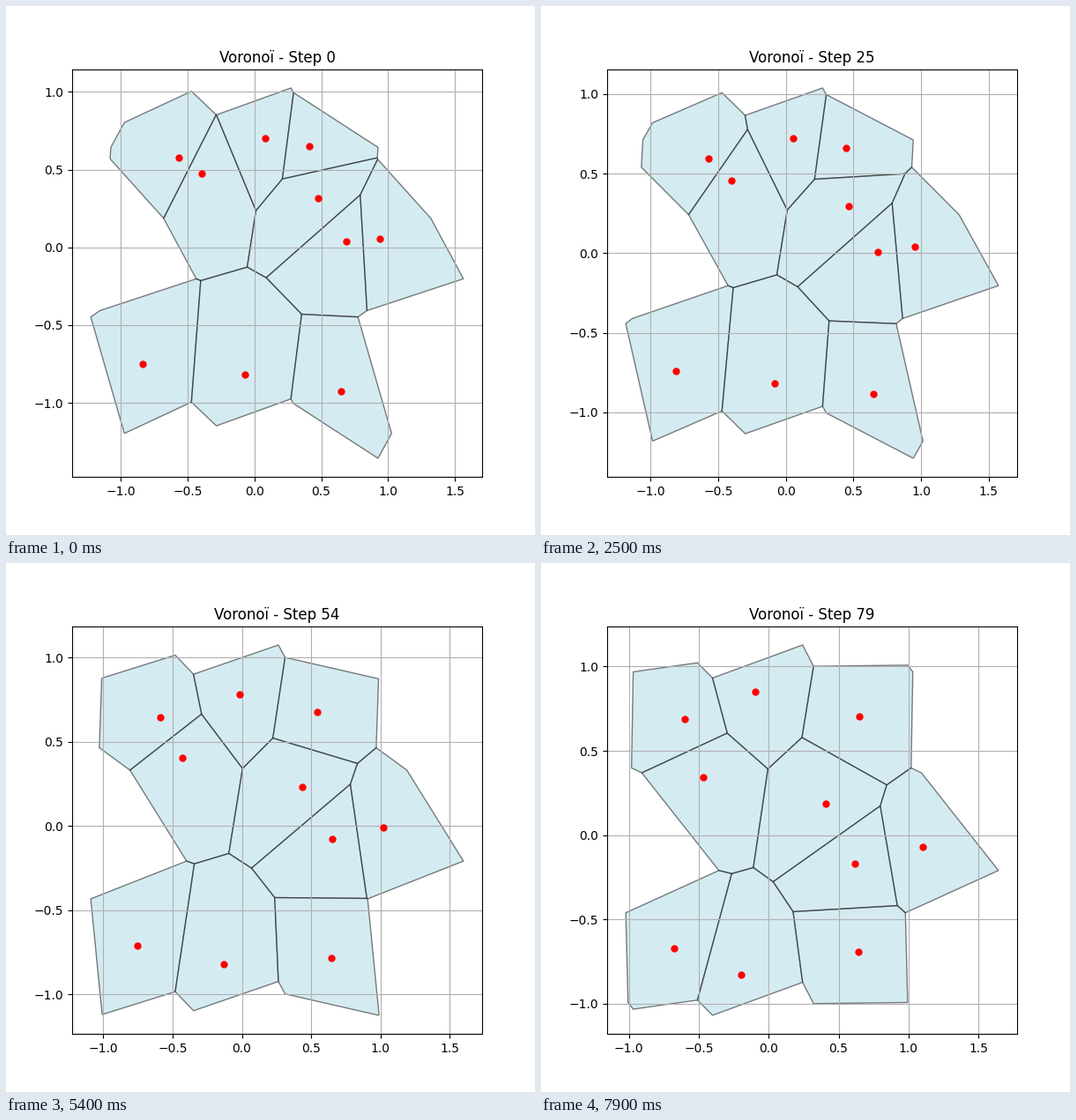
Animation of 600 by 600 pixels, one loop 8000 ms. Source, as a matplotlib script:

```python
import numpy as np
import matplotlib.pyplot as plt
from matplotlib.animation import FuncAnimation

STEPS = 80
PERIOD = 2.0

# Each seed: start x, y, travel in x, y, and how hard it is pushed off at the start.
SEEDS = np.array([
    (-0.565, 0.576, -0.035, 0.110, 1.0),
    (-0.394, 0.475, -0.073, -0.134, 0.4),
    (0.079, 0.702, -0.176, 0.146, 0.6),
    (0.411, 0.652, 0.239, 0.050, 0.6),
    (0.475, 0.318, -0.065, -0.133, 1.1),
    (0.687, 0.038, -0.068, -0.209, 0.5),
    (0.937, 0.055, 0.162, -0.127, 0.3),
    (-0.835, -0.750, 0.160, 0.078, 0.3),
    (-0.070, -0.818, -0.125, -0.011, 0.1),
    (0.647, -0.924, -0.003, 0.231, 1.0),
])
START, TRAVEL, PUSH = SEEDS[:, :2], SEEDS[:, 2:4], SEEDS[:, 4:]
SHIFTS = [np.array([i, j]) * PERIOD for i in (-1, 0, 1) for j in (-1, 0, 1)]
SQUARE = np.array([[-1, -1], [1, -1], [1, 1], [-1, 1]]) * PERIOD


def seeds_at(step):
    """Seeds start at rest and speed up; a larger push moves them earlier."""
    u = step / (STEPS - 1)
    return START + TRAVEL * u**2 * (1 + PUSH * (1 - u))


def clip(poly, normal, limit):
    """Keep the part of a convex polygon where p . normal <= limit."""
    side = poly @ normal - limit
    if side.max() <= 0:
        return poly
    kept = []
    for i in range(len(poly)):
        p, q, a, b = poly[i - 1], poly[i], side[i - 1], side[i]
        if (a <= 0) != (b <= 0):
            kept.append(p + (q - p) * a / (a - b))
        if b <= 0:
            kept.append(q)
    return np.array(kept)


def cell(seed, images):
    """Voronoi cell of one seed among all periodic images."""
    offsets = images - seed
    dist = np.hypot(*offsets.T)
    poly = SQUARE
    for k in np.argsort(dist):
        if 1e-9 < dist[k] <= PERIOD:
            poly = clip(poly, offsets[k], dist[k] ** 2 / 2)
    return poly + seed


fig, ax = plt.subplots(figsize=(6, 6), dpi=100)


def draw(step):
    ax.clear()
    seeds = seeds_at(step)
    images = np.concatenate([seeds + s for s in SHIFTS])
    for seed in seeds:
        ax.fill(*cell(seed, images).T, facecolor="lightblue", edgecolor="black", alpha=0.5)
    ax.plot(*seeds.T, "ro", markersize=5)
    ax.set_title(f"Voronoï - Step {step}")
    ax.grid(True)


anim = FuncAnimation(fig, draw, frames=STEPS, init_func=lambda: None, interval=100, repeat=True)
plt.show()
```
